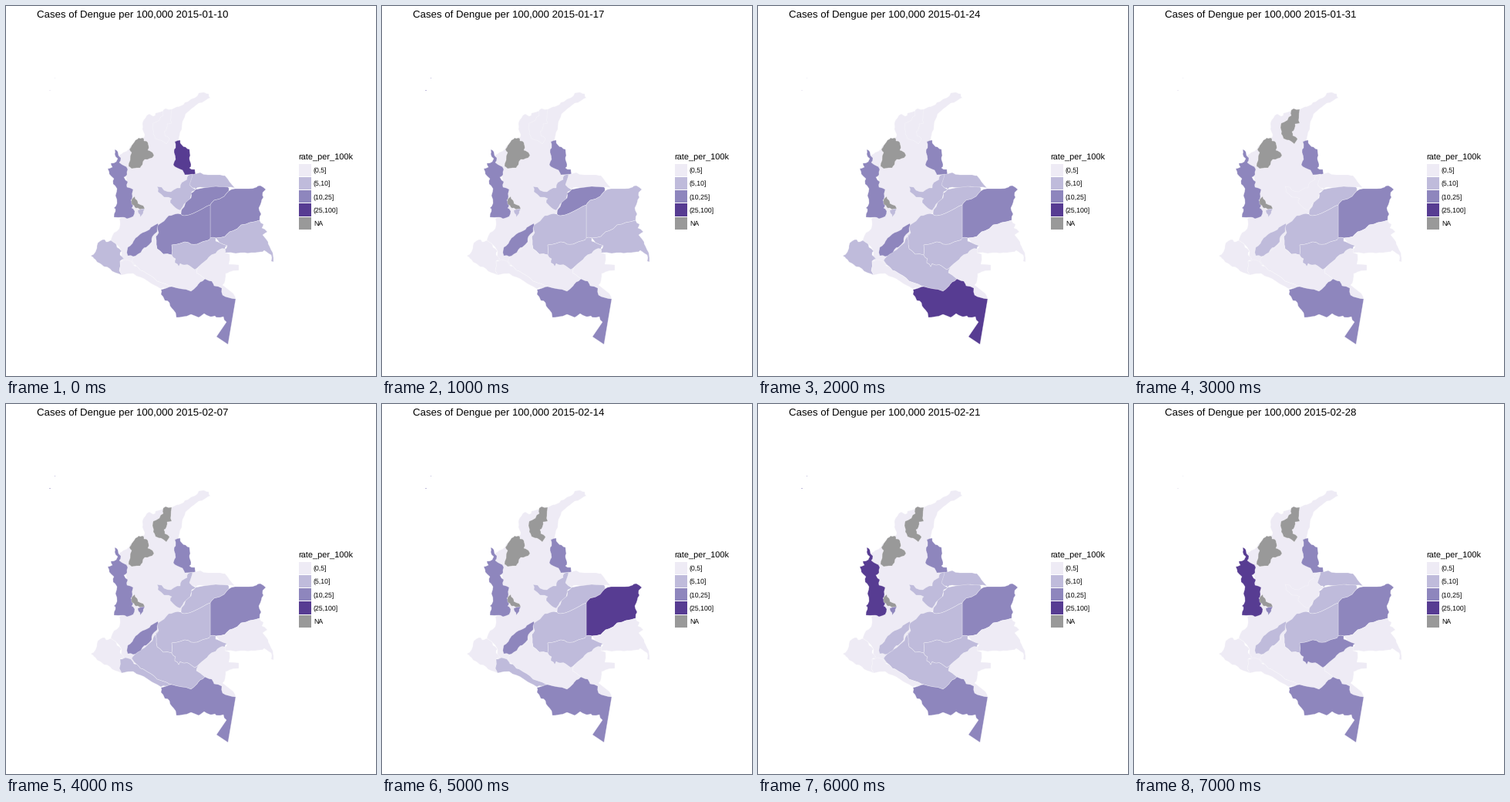
Animation of 480 by 480 pixels, one loop 8 s. Source, as a matplotlib script:

```python
import math

import matplotlib.pyplot as plt
from matplotlib.animation import FuncAnimation
from matplotlib.patches import Polygon, Rectangle

SIZE, DPI = 480, 100
PX = 72 / DPI  # points per pixel
WEEKS = 8
COLORS = ["#eeebf5", "#bfbbdb", "#8e86bd", "#573c92", "#999999"]
LABELS = ["(0,5]", "(5,10]", "(10,25]", "(25,100]", "NA"]
NA = 4

plt.rcParams["font.family"] = "Liberation Sans"
plt.rcParams["text.hinting"] = "none"

fig = plt.figure(figsize=(SIZE / DPI, SIZE / DPI), dpi=DPI, facecolor="white")
ax = fig.add_axes([0, 0, 1, 1])
ax.set_xlim(0, SIZE)
ax.set_ylim(SIZE, 0)
ax.axis("off")

regions = []


def roughen(points):
    """Shift edge midpoints by place only, so shared borders stay shared."""
    out = []
    for (x0, y0), (x1, y1) in zip(points, points[1:] + points[:1]):
        out.append((x0, y0))
        if 4 < math.hypot(x1 - x0, y1 - y0) < 16:
            mx, my = (x0 + x1) / 2, (y0 + y1) / 2
            out.append((mx + 0.9 * math.sin(12.9 * mx + 7.8 * my),
                        my + 0.9 * math.sin(4.7 * mx + 9.1 * my)))
    return out


def region(weekly, points):
    """Add a department; weekly holds its class for each week."""
    patch = Polygon(roughen(points), closed=True, lw=0.6 * PX,
                    edgecolor=(1, 1, 1, 0.45), joinstyle="round")
    ax.add_patch(patch)
    regions.append((patch, weekly))


def steady(level):
    return [level] * WEEKS


def label(x, y, text, size):
    return ax.text(x, y, text, fontsize=size * PX, color="black",
                   ha="left", va="baseline")


# North and centre
region(steady(0), [
    (146, 194), (152, 190), (160, 185), (163, 181), (168, 174), (177, 171),
    (180, 167), (177, 160), (177, 152), (181, 145), (186, 140), (191, 143),
    (194, 139), (204, 136), (207, 133), (215, 134), (221, 131), (230, 128),
    (236, 124), (245, 119), (250, 113), (257, 112), (263, 114), (265, 119),
    (258, 123), (250, 126), (241, 133), (233, 140), (229, 150), (228, 160),
    (225, 168), (222, 176), (224, 200), (235, 217), (240, 225), (235, 250),
    (228, 268), (211, 275), (200, 290), (193, 308), (172, 330), (166, 337),
    (155, 332), (148, 330), (150, 318), (142, 308), (136, 304), (138, 298),
    (144, 292), (148, 284), (147, 276), (152, 273), (162, 262), (157, 235),
    (155, 212), (147, 203)])

# Nariño
region([1, 0, 1, 0, 0, 0, 0, 0], [
    (110, 324), (116, 319), (118, 311), (122, 305), (128, 303), (130, 306),
    (136, 304), (142, 308), (144, 313), (150, 318), (148, 323), (153, 328),
    (148, 331), (147, 343), (150, 349), (142, 346), (135, 341), (127, 338),
    (122, 334), (116, 329), (113, 326)])

# Chocó
region([2, 2, 2, 2, 2, 2, 3, 3], [
    (141, 186), (145, 189), (146, 194), (149, 197), (147, 203), (153, 207),
    (158, 212), (157, 219), (153, 222), (158, 228), (157, 235), (165, 238),
    (164, 247), (162, 252), (165, 258), (163, 262), (167, 266), (165, 273),
    (157, 276), (152, 274), (140, 274), (142, 266), (140, 262), (144, 256),
    (142, 246), (144, 237), (139, 231), (140, 224), (134, 218), (132, 211),
    (138, 209), (136, 204), (143, 202), (145, 198), (141, 192)])

# Risaralda
region(steady(NA), [
    (163, 251), (167, 247), (170, 252), (171, 256), (178, 259), (180, 263),
    (174, 264), (171, 262), (167, 261), (163, 257)])

# Quindío
region([1, 1, 1, 1, 2, 2, 2, 2], [
    (171, 265), (180, 263), (178, 269), (174, 274), (172, 269)])

# Córdoba
region(steady(NA), [
    (168, 174), (172, 171), (177, 171), (179, 175), (184, 177), (185, 181),
    (184, 187), (190, 190), (192, 194), (186, 198), (180, 199), (177, 206),
    (174, 210), (163, 211), (159, 208), (161, 200), (163, 190), (160, 186),
    (163, 181)])

# Magdalena
region([0, 0, 0, NA, NA, NA, NA, NA], [
    (204, 135), (207, 133), (215, 134), (214, 145), (215, 152), (209, 153),
    (208, 160), (205, 163), (206, 168), (212, 172), (210, 176), (208, 179),
    (201, 174), (194, 172), (191, 166), (190, 158), (191, 152), (199, 148),
    (204, 142)])

# Norte de Santander
region([3, 2, 2, 2, 2, 2, 2, 2], [
    (219, 176), (226, 174), (228, 180), (233, 183), (238, 186), (239, 194),
    (238, 199), (240, 205), (238, 210), (245, 212), (246, 219), (232, 219),
    (229, 213), (222, 210), (217, 206), (220, 199), (218, 190), (220, 184)])

# Arauca
region([1, 0, 1, 0, 0, 0, 1, 1], [
    (240, 219), (252, 216), (262, 219), (278, 219), (284, 220), (290, 228),
    (297, 236), (288, 235), (275, 234), (265, 236), (252, 235), (246, 238),
    (242, 236), (236, 231), (234, 225)])

# Boyacá
region([1, 1, 1, 0, 1, 1, 1, 0], [
    (196, 234), (202, 235), (205, 239), (214, 241), (222, 236), (226, 236),
    (228, 229), (235, 225), (236, 220), (242, 218), (240, 226), (238, 232),
    (246, 238), (241, 241), (239, 250), (231, 257), (226, 265), (220, 262),
    (213, 255), (215, 250), (205, 248), (197, 241)])

# Casanare
region([2, 2, 1, 1, 1, 1, 1, 1], [
    (246, 238), (256, 236), (272, 234), (288, 235), (289, 240), (283, 247),
    (270, 252), (265, 258), (255, 263), (243, 269), (232, 272), (227, 270),
    (228, 264), (233, 255), (240, 249), (240, 243)])

# Vichada
region([2, 1, 2, 2, 2, 3, 2, 2], [
    (289, 240), (297, 237), (315, 237), (325, 235), (330, 233), (337, 238),
    (333, 242), (334, 248), (331, 255), (328, 262), (331, 270), (329, 278),
    (316, 281), (305, 284), (300, 289), (290, 293), (284, 299), (272, 301),
    (265, 301), (265, 258), (270, 252), (283, 247)])

# Meta
region([2, 1, 1, 1, 1, 1, 1, 1], [
    (265, 258), (265, 301), (272, 301), (262, 304), (248, 309), (240, 309),
    (232, 306), (226, 308), (215, 310), (215, 323), (204, 322), (196, 315),
    (195, 304), (194, 298), (198, 294), (196, 285), (205, 279), (211, 272),
    (219, 270), (227, 270), (232, 272), (243, 269), (255, 263)])

# Guainía
region([1, 1, 0, 0, 0, 0, 0, 0], [
    (272, 301), (284, 299), (290, 293), (300, 289), (305, 284), (316, 281),
    (329, 278), (334, 283), (332, 288), (339, 293), (333, 297), (340, 306),
    (342, 312), (346, 320), (347, 332), (344, 331), (344, 323), (338, 319),
    (335, 317), (330, 319), (318, 320), (310, 320), (298, 321), (284, 320),
    (283, 316), (287, 311), (277, 307)])

# Vaupés
region(steady(0), [
    (263, 326), (272, 321), (277, 316), (284, 315), (284, 320), (290, 322),
    (289, 335), (302, 336), (302, 343), (290, 345), (285, 347), (284, 357),
    (281, 362), (295, 373), (298, 380), (288, 378), (281, 375), (280, 366),
    (270, 363), (267, 357), (258, 354), (247, 346), (250, 338), (257, 332)])

# Caquetá
region([0, 0, 1, 0, 1, 0, 1, 0], [
    (198, 294), (194, 298), (195, 304), (196, 315), (204, 322), (215, 323),
    (220, 328), (219, 333), (224, 338), (226, 334), (231, 336), (238, 337),
    (245, 342), (250, 338), (247, 346), (258, 354), (252, 358), (248, 363),
    (240, 370), (228, 367), (215, 364), (208, 361), (196, 357), (188, 350),
    (178, 344), (172, 340), (163, 330), (168, 324), (180, 316), (190, 307),
    (193, 300)])

# Guaviare
region([1, 1, 1, 1, 1, 1, 1, 2], [
    (215, 310), (226, 308), (232, 306), (240, 309), (248, 309), (262, 304),
    (265, 301), (272, 301), (272, 305), (277, 307), (287, 311), (284, 315),
    (277, 316), (272, 321), (263, 326), (257, 332), (250, 338), (245, 342),
    (238, 337), (231, 336), (226, 334), (224, 338), (219, 333), (220, 328),
    (215, 323)])

# Putumayo
region([0, 0, 0, 0, 1, 1, 0, 0], [
    (148, 331), (155, 329), (162, 331), (166, 337), (172, 340), (178, 344),
    (188, 350), (196, 357), (208, 361), (215, 364), (208, 366), (201, 367),
    (192, 362), (184, 357), (175, 352), (165, 347), (150, 349), (147, 343)])

# Amazonas
region([2, 2, 3, 2, 2, 2, 2, 2], [
    (201, 368), (208, 366), (215, 364), (228, 367), (240, 370), (248, 363),
    (252, 358), (258, 354), (267, 357), (270, 363), (280, 366), (281, 375),
    (288, 378), (298, 380), (288, 439), (273, 429), (286, 410), (282, 403),
    (276, 404), (271, 402), (265, 403), (257, 399), (250, 404), (240, 400),
    (230, 403), (221, 404), (220, 398), (215, 392), (212, 385), (206, 382),
    (201, 374)])

# Huila
region([2, 2, 2, 1, 2, 2, 1, 1], [
    (157, 318), (158, 313), (164, 308), (168, 301), (174, 296), (180, 293),
    (186, 290), (190, 286), (197, 282), (196, 288), (196, 293), (190, 299),
    (189, 306), (182, 313), (177, 316), (171, 322), (165, 325), (158, 324)])

# San Andrés y Providencia
for x, y in [(62.9, 93.4), (56.4, 109.2)]:
    dot = Rectangle((x, y), 1.1, 1.1, lw=0)
    ax.add_patch(dot)
    regions.append((dot, [0, 1, 0, 0, 1, 1, 1, 0]))

# Legend
label(379.2, 200, "rate_per_100k", 11)
for i, (color, text) in enumerate(zip(COLORS, LABELS)):
    top = 204.5 + 17.28 * i
    ax.add_patch(Rectangle((380, top), 16.2, 16.2, color=color, lw=0))
    label(398.8, top + 11.7, text, 8.8)

title = label(39.5, 15, "", 13.2)


def draw(week):
    day = 10 + 7 * week
    month, day = (day - 1) // 31 + 1, (day - 1) % 31 + 1
    title.set_text(f"Cases of Dengue per 100,000 2015-{month:02d}-{day:02d}")
    for patch, weekly in regions:
        patch.set_facecolor(COLORS[weekly[week]])
    return [title] + [patch for patch, _ in regions]


anim = FuncAnimation(fig, draw, frames=WEEKS, interval=1000,
                     repeat=True, repeat_delay=0, blit=False)
plt.show()
```
